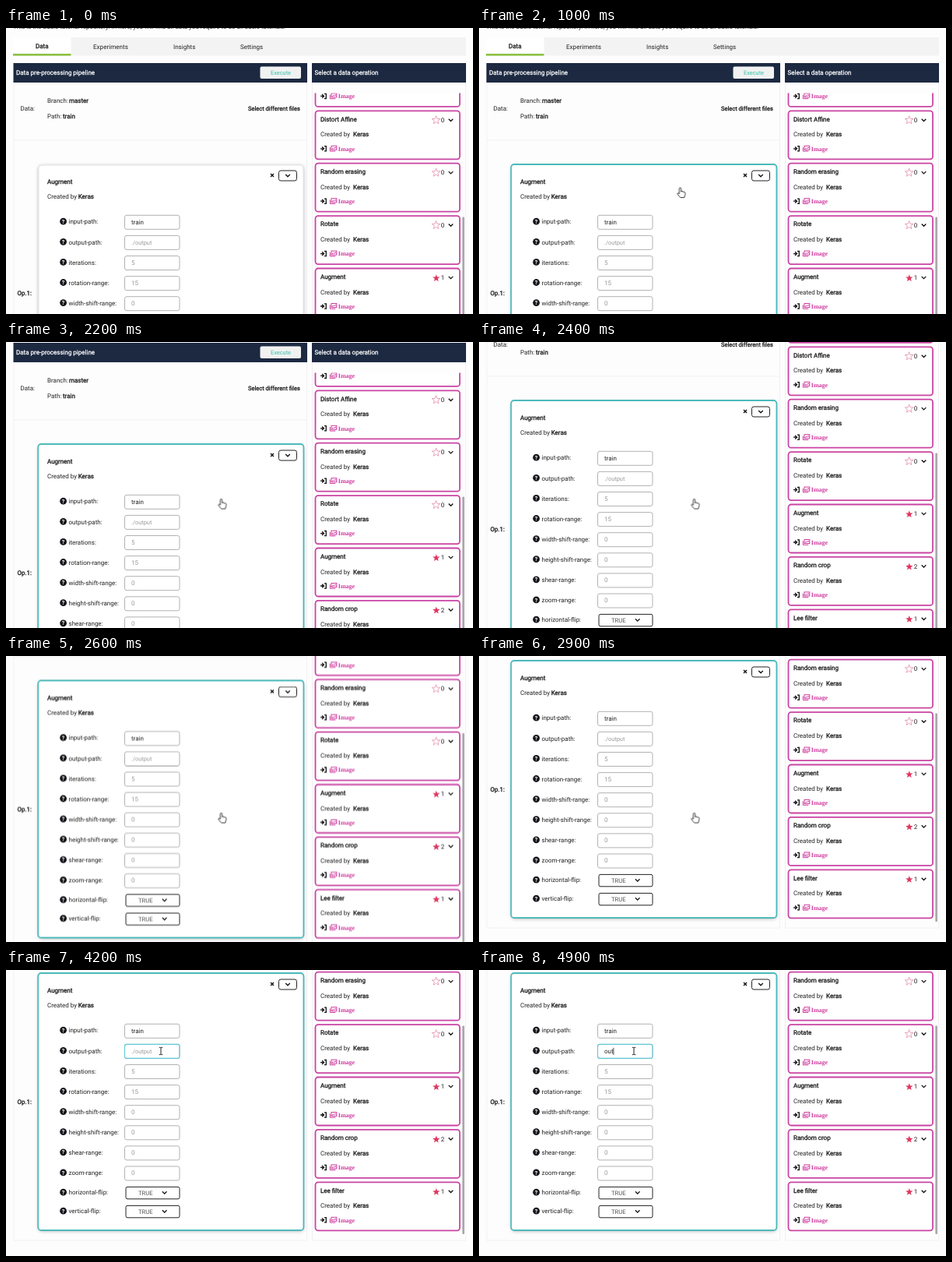
An HTML page that plays this animation: 600x367 px, repeating every 5000 ms.

```html
<!DOCTYPE html>
<html lang="en">
<head>
<meta charset="utf-8">
<title>Data pre-processing pipeline</title>
<style>
html, body { margin: 0; width: 100%; height: 100%; overflow: hidden; background: #fefdfe; }
svg { display: block; width: 600px; height: 367px; }
text { font: 8px Roboto, Arial, sans-serif; fill: #222; text-rendering: geometricPrecision; white-space: pre; }
.bold { fill: #111; stroke: #111; stroke-width: .28px; }
.head { fill: #fff; stroke: #fff; stroke-width: .28px; }
.hint { fill: #999; }
.tag { font: bold 8px "Liberation Serif", serif; fill: #cf3c9f; }
.line { fill: none; stroke: #222; stroke-width: 1; }
.chevron { fill: none; stroke: #111; stroke-width: 1.3; }
.faint { fill: none; stroke: #f2f0f2; }
.anim { animation: 5s step-end -.02s infinite; }

#page { animation-name: scroll; }
#hover { animation-name: hover; }
#hand { animation-name: hand; }
#beam { animation-name: beam; }
#focus { animation-name: focus; }
#hint { animation-name: hint; }
#caret { animation-name: caret; }
#key0 { animation-name: key0; }
#key1 { animation-name: key1; }
#key2 { animation-name: key2; }

@keyframes scroll {
  0% { transform: translateY(0); }
  42% { transform: translateY(-14px); }
  44% { transform: translateY(-44px); }
  46% { transform: translateY(-72px); }
  48% { transform: translateY(-100px); }
  50% { transform: translateY(-126px); }
  52% { transform: translateY(-143.5px); }
  54% { transform: translateY(-156px); }
  56% { transform: translateY(-164px); }
  58% { transform: translateY(-169px); }
  60%, 100% { transform: translateY(-171px); }
}
@keyframes hover {
  0% { opacity: 0; }
  14% { opacity: .35; }
  16% { opacity: .75; }
  18%, 100% { opacity: 1; }
}
@keyframes hand {
  0% { transform: translate(300px, 232px); opacity: 0; }
  14% { transform: translate(300px, 232px); opacity: 1; }
  16% { transform: translate(285px, 222px); }
  18% { transform: translate(268px, 211px); }
  20% { transform: translate(258.5px, 205px); }
  26% { transform: translate(260px, 205px); }
  28% { transform: translate(264px, 204px); }
  30% { transform: translate(269px, 203px); }
  32% { transform: translate(273px, 202px); }
  34% { transform: translate(275.5px, 201.5px); }
  36% { transform: translate(276.5px, 201.5px); }
  62% { transform: translate(270px, 190px); }
  64% { transform: translate(262px, 178px); }
  68% { transform: translate(235px, 140px); opacity: 1; }
  70%, 100% { transform: translate(205px, 108px); opacity: 0; }
}
@keyframes beam {
  0% { transform: translate(201px, 106px); opacity: 0; }
  70% { transform: translate(201px, 106px); opacity: 1; }
  72%, 100% { transform: translate(199px, 104px); opacity: 1; }
}
@keyframes focus { 0% { opacity: 0; } 72%, 100% { opacity: 1; } }
@keyframes hint { 0% { opacity: 1; } 88%, 100% { opacity: 0; } }
@keyframes caret {
  0% { transform: translateX(161.3px); opacity: 0; }
  72% { transform: translateX(161.3px); opacity: 1; }
  78% { transform: translateX(161.3px); opacity: 0; }
  88% { transform: translateX(165.8px); opacity: 1; }
  94% { transform: translateX(170.2px); opacity: 1; }
  98%, 100% { transform: translateX(172.7px); opacity: 1; }
}
@keyframes key0 { 0% { visibility: hidden; } 88%, 100% { visibility: visible; } }
@keyframes key1 { 0% { visibility: hidden; } 94%, 100% { visibility: visible; } }
@keyframes key2 { 0% { visibility: hidden; } 98%, 100% { visibility: visible; } }
</style>
</head>
<body>
<svg id="stage" viewBox="0 0 600 367"></svg>
<script>
const text = (x, y, str, cls = '', size = 8) =>
  `<text x="${x}" y="${y}" class="${cls}" style="font-size:${size}px">${str}</text>`;
const rect = (x, y, w, h, attrs = '') =>
  `<rect x="${x}" y="${y}" width="${w}" height="${h}" ${attrs}/>`;
const chevron = (x, y) =>
  `<path class="chevron" d="M${x - 2.8} ${y - 1.4}l2.8 2.8 2.8-2.8"/>`;

function star(x, y, r, attrs) {
  const points = Array.from({ length: 10 }, (_, i) => {
    const a = i * Math.PI / 5 - Math.PI / 2, d = i % 2 ? r * .42 : r;
    return `${(x + d * Math.cos(a)).toFixed(2)},${(y + d * Math.sin(a)).toFixed(2)}`;
  });
  return `<polygon points="${points.join(' ')}" ${attrs}/>`;
}

function topBar() {
  return text(9, 1, 'This is the Basic tutorial repository. In here, you will find all data you require to do all basic tutorials.') +
    rect(9, 12, 582, 23.5, 'fill="#f4f3f4"') +
    rect(9, 12, 74.5, 23.5, 'fill="#fff"') +
    rect(9, 33, 74.5, 2.6, 'fill="#8cc043"') +
    text(38, 26, 'Data', 'bold') +
    text(112, 27, 'Experiments', '', 8.1) +
    text(215, 27, 'Insights') +
    text(301, 27, 'Settings');
}

function panels() {
  return `<path class="faint" d="M10 70V518H386.5V70M393.5 70V518H590.5V70M10 144H386.5"/>` +
    rect(9.5, 45, 377.5, 25, 'fill="#1c2941"') +
    rect(393, 45, 198, 25, 'fill="#1c2941"') +
    text(13, 60, 'Data pre-processing pipeline', 'head') +
    text(396.5, 60, 'Select a data operation', 'head') +
    rect(326.5, 49.5, 52.5, 15.5, 'rx="2" fill="#f1f1f1"') +
    `<text x="340" y="60" style="font-size:7.4px;fill:#35c3a8">Execute</text>` +
    text(18.5, 106, 'Data:') +
    text(53, 95.5, 'Branch:') + text(81, 95.5, 'master', 'bold') +
    text(53, 115.5, 'Path:') + text(73, 115.5, 'train', 'bold') +
    text(311, 105.8, 'Select different files', 'bold', 7.55) +
    text(14.5, 342.5, 'Op.1:', 'bold');
}

function label(name, y) {
  return `<circle cx="73.6" cy="${y - .8}" r="4.4" fill="#16161c"/>` +
    `<text x="73.6" y="${y + 1.8}" text-anchor="middle" style="font-size:7px;font-weight:700;fill:#fff">?</text>` +
    text(80.5, y + 2.4, name + ':');
}

function field([name, value], i) {
  const y = 249 + 26.1 * i;
  const output = name === 'output-path';
  const content = text(161, y + 2.6, value, i ? 'hint' : '', output ? 7.4 : 8);
  return label(name, y) +
    rect(152.5, y - 8.7, 70.5, 18, 'rx="2.5" fill="#fff" stroke="#aaa9ad" stroke-width=".9"') +
    (output ? `<g id="hint" class="anim">${content}</g>` : content);
}

function toggle(name, i) {
  const y = 457 + 24 * i;
  return label(name, y) +
    rect(154, y - 7.6, 69, 15.4, 'rx="2" fill="#fff" stroke="#222" stroke-width="1"') +
    `<text x="170" y="${y + 2.6}" style="font-size:7.7px;fill:#555">TRUE</text>` +
    chevron(203.7, y - .3);
}

function augmentCard() {
  const box = 'rx="4" fill="#fff"';
  const fields = [['input-path', 'train'], ['output-path', './output'], ['iterations', 5],
    ['rotation-range', 15], ['width-shift-range', 0], ['height-shift-range', 0],
    ['shear-range', 0], ['zoom-range', 0]];
  const typed = [...'out'].map((c, i) => `<tspan id="key${i}" class="anim">${c}</tspan>`).join('');
  return rect(42, 176, 340, 329, box + ' stroke="#e6e4e6" style="filter:drop-shadow(0 1px 2px #0004)"') +
    `<g id="hover" class="anim">${rect(41.2, 175, 341.2, 330, box + ' stroke="#4dbabb" stroke-width="1.8"')}</g>` +
    `<path d="M340 187l4 4m0-4l-4 4" stroke="#111" stroke-width="1.4"/>` +
    rect(350.5, 183, 23, 13, 'rx="2.5" class="line"') + chevron(362, 189.4) +
    text(53, 200, 'Augment', 'bold') +
    text(53, 219.4, 'Created by') + text(92.7, 219.4, 'Keras', 'bold') +
    fields.map(field).join('') +
    ['horizontal-flip', 'vertical-flip'].map(toggle).join('') +
    `<g id="focus" class="anim">${rect(152.5, 266.4, 70.5, 18, 'rx="2.5" fill="none" stroke="#62c9d6" stroke-width="1.1"')}</g>` +
    text(161, 277.7, typed) +
    `<path id="caret" class="anim" d="M0 270.8v9.2" stroke="#222" stroke-width=".9"/>`;
}

function operation([name, stars], i) {
  const y = 38.9 + 67.4 * i;
  return rect(397.5, y, 185.5, 62, 'rx="3.5" fill="#fff" stroke="#c945a3" stroke-width="1.8"') +
    text(404, y + 13.3, name, 'bold') +
    text(404, y + 33, 'Created by') + text(446, y + 33, 'Keras', 'bold') +
    (stars ? star(552.8, y + 12.6, 4.9, 'fill="#e0365f"')
           : star(552.6, y + 12, 5.6, 'fill="#fff" stroke="#e58bab" stroke-width=".8"')) +
    text(558.7, y + 14.6, stars) + chevron(571.5, y + 11.8) +
    `<path d="M404 ${y + 48.5}h4m-2-2.3l2.5 2.3-2.5 2.3M409 ${y + 45.4}h2.3v6.2h-2.3" fill="none" stroke="#111" stroke-width="1.3"/>` +
    `<g fill="none" stroke="#cf3c9f" stroke-width="1">${rect(418, y + 45, 6.8, 5)}` +
    `<path d="M416.3 ${y + 46.8}v5h7M418.6 ${y + 49.3}l1.8-1.8 1 1 1.6-1.8 1.4 1.6"/></g>` +
    text(426.8, y + 51.2, 'Image', 'tag');
}

function operations() {
  const list = [['Flip', 0], ['Distort Affine', 0], ['Random erasing', 0], ['Rotate', 0],
    ['Augment', 1], ['Random crop', 2], ['Lee filter', 1]];
  return `<clipPath id="list">${rect(393, 83.5, 198, 426)}</clipPath>` +
    `<g clip-path="url(#list)">${list.map(operation).join('')}</g>` +
    rect(586.3, 242.5, 2.7, 267.5, 'rx="1" fill="#a9a8aa"');
}

const cursors =
  `<path id="hand" class="anim" fill="#fff" stroke="#222" stroke-width=".9" stroke-linejoin="round"
    d="M-1.2 1.2a1.2 1.2 0 0 1 2.4 0V5.2a1 1 0 0 1 2 .2 1 1 0 0 1 1.7 .3 1 1 0 0 1 1.5 .6V8.6L5.2 12.6H.2L-3.4 8.4a1 1 0 0 1 1.3-1.5L-1.2 8Z"/>` +
  `<path id="beam" class="anim" fill="none" stroke="#222" stroke-width="1"
    d="M-2.2-4.6h1.7l.5.5.5-.5h1.7M0-4.2v8.4M-2.2 4.6h1.7l.5-.5.5.5h1.7"/>`;

document.getElementById('stage').innerHTML =
  `<g id="page" class="anim">${topBar()}${panels()}${augmentCard()}${operations()}</g>${cursors}`;
</script>
</body>
</html>
```
